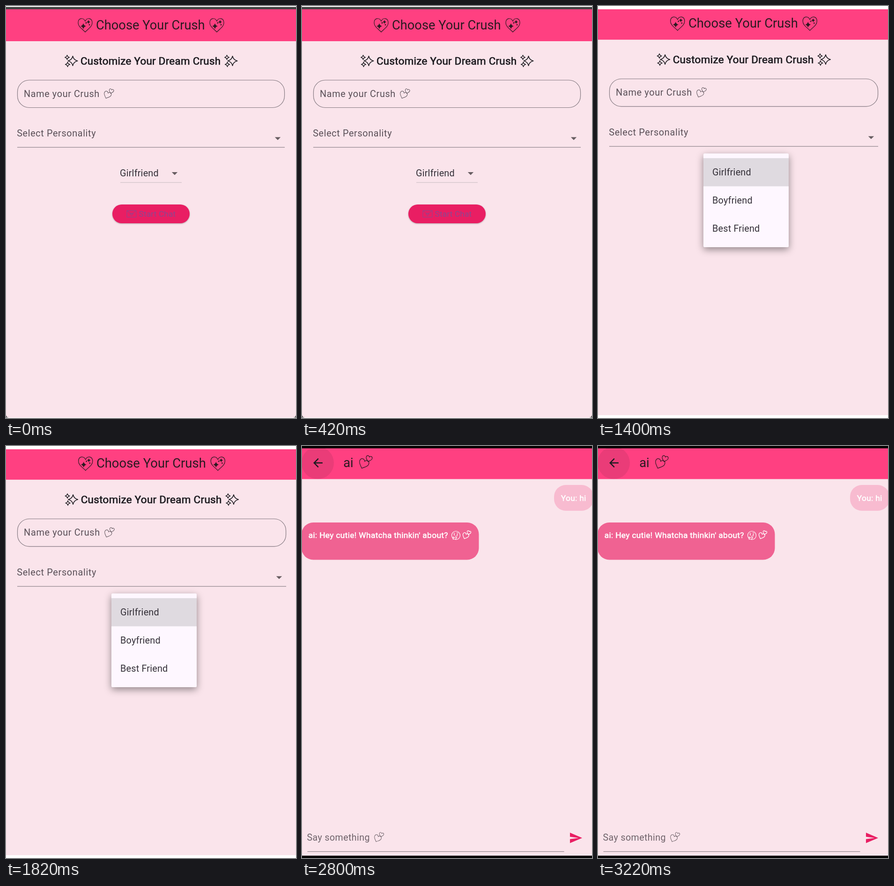
Write an HTML page with a canvas that moves like this. It is 619 by 878 pixels and loops after 3.5 s.

```html
<!DOCTYPE html>
<html lang="en">
<head>
<meta charset="utf-8">
<title>Choose Your Crush</title>
<style>
html, body { margin: 0; width: 100%; height: 100%; overflow: hidden; background: #fff; }
canvas { display: block; width: 619px; height: 878px; }
</style>
</head>
<body>
<canvas id="stage" width="619" height="878"></canvas>
<script>
const ctx = document.getElementById('stage').getContext('2d');
const W = 619, H = 878, HOLD = 700;
const PINK = '#ff4081', BLUSH = '#fae4eb', ROSE = '#e91e63';
const INK = '#1d1b20', LABEL = '#5a5058', LINE = '#857a82', MENU = '#fef7ff';

function rect(x, y, w, h, color) {
  ctx.fillStyle = color;
  ctx.fillRect(x, y, w, h);
}

function round(x, y, w, h, r, color) {
  ctx.beginPath();
  ctx.roundRect(x, y, w, h, r);
  ctx.fillStyle = color;
  ctx.fill();
}

function text(str, x, y, size, color, spacing = 0, embolden = 0) {
  ctx.font = `400 ${size}px Roboto, sans-serif`;
  ctx.letterSpacing = `${spacing}px`;
  ctx.fillStyle = color;
  ctx.fillText(str, x, y);
  if (!embolden) return;
  ctx.lineWidth = embolden;
  ctx.lineJoin = 'round';
  ctx.strokeStyle = color;
  ctx.strokeText(str, x, y);
}

const title = (str, x, y) => text(str, x, y, 27.3, '#2b1a21');
const label = (str, x, y) => text(str, x, y, 19.84, LABEL, 0.62);
const option = (str, x, y) => text(str, x, y, 19.84, '#343038', 0.19);

function at(x, y, scale, angle, draw) {
  ctx.save();
  ctx.translate(x, y);
  ctx.rotate(angle);
  ctx.scale(scale, scale);
  draw();
  ctx.restore();
}

function stroke(color, width) {
  ctx.strokeStyle = color;
  ctx.lineWidth = width;
  ctx.lineJoin = 'round';
  ctx.stroke();
}

function heart(x, y, size, angle, color, width) {
  at(x, y, size, angle, () => {
    ctx.beginPath();
    ctx.moveTo(0, -0.27);
    ctx.bezierCurveTo(-0.12, -0.55, -0.5, -0.52, -0.5, -0.15);
    ctx.bezierCurveTo(-0.5, 0.12, -0.2, 0.28, 0, 0.5);
    ctx.bezierCurveTo(0.2, 0.28, 0.5, 0.12, 0.5, -0.15);
    ctx.bezierCurveTo(0.5, -0.52, 0.12, -0.55, 0, -0.27);
    ctx.closePath();
    stroke(color, width / size);
  });
}

function star(x, y, r, color, width) {
  ctx.beginPath();
  ctx.moveTo(x, y - r);
  for (let i = 0; i < 4; i++) {
    const a = i * Math.PI / 2, k = r * 0.26;
    const inner = a - Math.PI / 4;
    ctx.quadraticCurveTo(x + k * Math.cos(inner), y + k * Math.sin(inner),
                         x + r * Math.cos(a), y + r * Math.sin(a));
  }
  ctx.closePath();
  if (width) return stroke(color, width);
  ctx.fillStyle = color;
  ctx.fill();
}

// Emoji boxes are given by their left and top edges.
function twoHearts(x, y, width, color, line) {
  const u = width / 30;
  heart(x + 11 * u, y + 17.5 * u, 20.5 * u, 0.4, color, line);
  heart(x + 22.3 * u, y + 6.6 * u, 13 * u, 0.3, color, line);
}

function sparklingHeart(x, y) {
  heart(x + 16, y + 14.5, 30, 0, '#2b1a21', 1.2);
  star(x + 12, y + 17, 6.2, '#2b1a21');
  star(x + 23, y + 8, 4.2, '#2b1a21');
  star(x + 18, y + 10, 2.2, '#2b1a21');
  star(x + 25, y + 14, 2, '#2b1a21');
}

function sparkles(x, y) {
  star(x + 17.5, y + 13, 10.2, INK, 1.6);
  star(x + 5.5, y + 5.5, 4.8, INK, 1.4);
  star(x + 6.5, y + 20.5, 5, INK, 1.4);
}

function thinkingFace(x, y) {
  ctx.beginPath();
  ctx.arc(x, y, 9, 0, Math.PI * 2);
  ctx.moveTo(x - 5, y - 4);
  ctx.lineTo(x - 2, y - 5);
  ctx.moveTo(x + 1.5, y - 6);
  ctx.lineTo(x + 5, y - 4.5);
  ctx.moveTo(x - 2, y + 2);
  ctx.lineTo(x + 3.5, y + 1);
  ctx.moveTo(x - 6, y + 9);
  ctx.lineTo(x - 6, y + 3);
  ctx.lineTo(x - 3.5, y + 5);
  ctx.lineTo(x + 2, y + 4);
  ctx.lineTo(x - 1, y + 9);
  stroke('#fff', 1.2);
  for (const dx of [-3.5, 3]) round(x + dx - 1, y - 3, 2, 3, 1, '#fff');
}

function envelope(x, y, color) {
  ctx.beginPath();
  ctx.rect(x, y, 20, 14);
  ctx.moveTo(x, y);
  ctx.lineTo(x + 10, y + 8);
  ctx.lineTo(x + 20, y);
  stroke(color, 1);
  heart(x + 10, y + 8, 6, 0, color, 1);
}

function icon(path, x, y, color) {
  at(x, y, 1.24, 0, () => {
    ctx.fillStyle = color;
    ctx.fill(new Path2D(path));
  });
}

const backArrow = (x, y) =>
  icon('M20 11H7.83l5.59-5.59L12 4l-8 8 8 8 1.41-1.41L7.83 13H20z', x - 14.9, y - 14.9, INK);
const sendIcon = (x, y) =>
  icon('M2 21L23 12 2 3v7l15 2-15 2z', x - 2.5, y - 3.7, ROSE);

function caret(x, y) {
  ctx.beginPath();
  ctx.moveTo(x - 6.2, y);
  ctx.lineTo(x + 6.2, y);
  ctx.lineTo(x, y + 6.2);
  ctx.fillStyle = '#675d61';
  ctx.fill();
}

function form(x, y, scale) {
  ctx.save();
  ctx.beginPath();
  ctx.rect(0, 7, W, H);
  ctx.clip();
  ctx.translate(x, y);
  ctx.scale(scale, scale);
  rect(-1, 0, W + 2, 75, PINK);
  sparklingHeart(153, 26);
  title('Choose Your Crush', 192, 49.5);
  sparklingHeart(434, 26);

  sparkles(125, 104);
  text('Customize Your Dream Crush', 159, 124.5, 22.3, INK, 0.31, 0.7);
  sparkles(466, 104);

  ctx.beginPath();
  ctx.roundRect(24.5, 158, 570, 58.5, 25);
  stroke(LINE, 1.2);
  label('Name your Crush', 38, 194);
  twoHearts(208, 176.5, 22.5, LABEL, 1);

  label('Select Personality', 23.2, 278);
  caret(580, 279.5);
  rect(24, 300.6, 571, 1.1, LINE);

  option('Girlfriend', 243, 363);
  caret(360, 354);
  rect(244, 375.6, 131, 1, '#c6b9be');

  ctx.shadowColor = 'rgba(0,0,0,.3)';
  ctx.shadowBlur = 3;
  ctx.shadowOffsetY = 1;
  round(227, 423, 165, 40, 20, ROSE);
  ctx.shadowColor = 'transparent';
  envelope(258, 436, '#8c4691');
  text('Start Chat', 283.5, 449, 17.36, '#8c4691', 0.12);
  ctx.restore();
}

function menu(x, y, w, h, row, items, textX) {
  ctx.save();
  ctx.shadowColor = 'rgba(0,0,0,.42)';
  ctx.shadowBlur = 16;
  ctx.shadowOffsetY = 5;
  round(x, y, w, h, 2.5, MENU);
  ctx.restore();
  rect(x, y + 10, w, row, '#dfdae0');
  items.forEach((item, i) => option(item, textX, y + 46.3 + i * row));
}

function chat(x, y, composeX, composeY, lineY, lineEnd) {
  backArrow(x + 33, y + 32);
  title('ai', x + 87.2, y + 41);
  twoHearts(x + 119.5, y + 16.5, 30, '#2b1a21', 1.2);
  text('Say something', composeX - 1, composeY + 7, 19.6, '#6f636a', 0.42);
  twoHearts(composeX + 141.5, composeY - 10.5, 22, '#6f636a', 1);
  rect(composeX, lineY, lineEnd - composeX, 1.1, LINE);
}

function startScreen() {
  rect(0, 2, W, 875, '#444');
  round(0, 7, W, 870, [0, 0, 6, 6], BLUSH);
  form(0, 0, 1);
}

function personalityScreen() {
  rect(0, 7, 8, 864, '#4a4448');
  round(1, 7, 618, 864, [0, 0, 0, 6], BLUSH);
  form(2, -4, 1);
  menu(1, 228, 620, 556, 59.6, ['Cute', 'Funny', 'Romantic', 'Caring', 'Sarcastic',
    'Supportive', 'Sensitive', 'Mood Swings', 'Cute but Angry'], 20);
  rect(0, 7, 1, 858, '#4a4448');
}

function relationScreen() {
  rect(0, 7, W, 865, BLUSH);
  form(-0.13, -3.6, 1.0053);
  // Only the open menu remains in the lower half.
  rect(0, 305, W, 567, BLUSH);
  menu(225, 314.3, 182, 199.7, 60, ['Girlfriend', 'Boyfriend', 'Best Friend'], 244);
}

function emptyChat() {
  rect(0, 0, W, H, '#3a3337');
  round(0, 0, W, 876, [0, 0, 6, 6], BLUSH);
  rect(0, 0, W, 67, PINK);
  chat(0, 0, 10.5, 833, 862.8, 560.5);
  sendIcon(573, 823);
}

function activeChat() {
  rect(0, 0, W, H, '#000');
  rect(0, 5, W, 868, BLUSH);
  rect(0, 5, W, 65.5, PINK);
  ctx.save();
  ctx.beginPath();
  ctx.rect(0, 5, W, 65.5);
  ctx.clip();
  round(-1, 1.5, 69, 69, 34.5, 'rgba(29,27,32,.09)');
  ctx.restore();
  chat(1, 4, 11.5, 834, 863.8, 559.5);
  sendIcon(572, 824);

  round(538, 83, 84, 55, 25, '#f8bbd0');
  text('You: hi', 552.7, 116.5, 17.4, '#fff', 0.31, 0.55);
  round(-1, 163, 378.5, 79.5, 25, '#f06292');
  text("ai: Hey cutie! Whatcha thinkin' about?", 13.7, 196, 17.4, '#fff', 0.31, 0.55);
  thinkingFace(328.5, 190.5);
  twoHearts(342, 180.5, 19, '#fff', 1.3);
}

const screens = [startScreen, personalityScreen, relationScreen, emptyChat, activeChat];
let shown = -1;

function tick() {
  const index = Math.floor(performance.now() / HOLD) % screens.length;
  if (index !== shown) {
    shown = index;
    rect(0, 0, W, H, '#fff');
    screens[index]();
  }
  requestAnimationFrame(tick);
}
tick();
</script>
</body>
</html>
```
